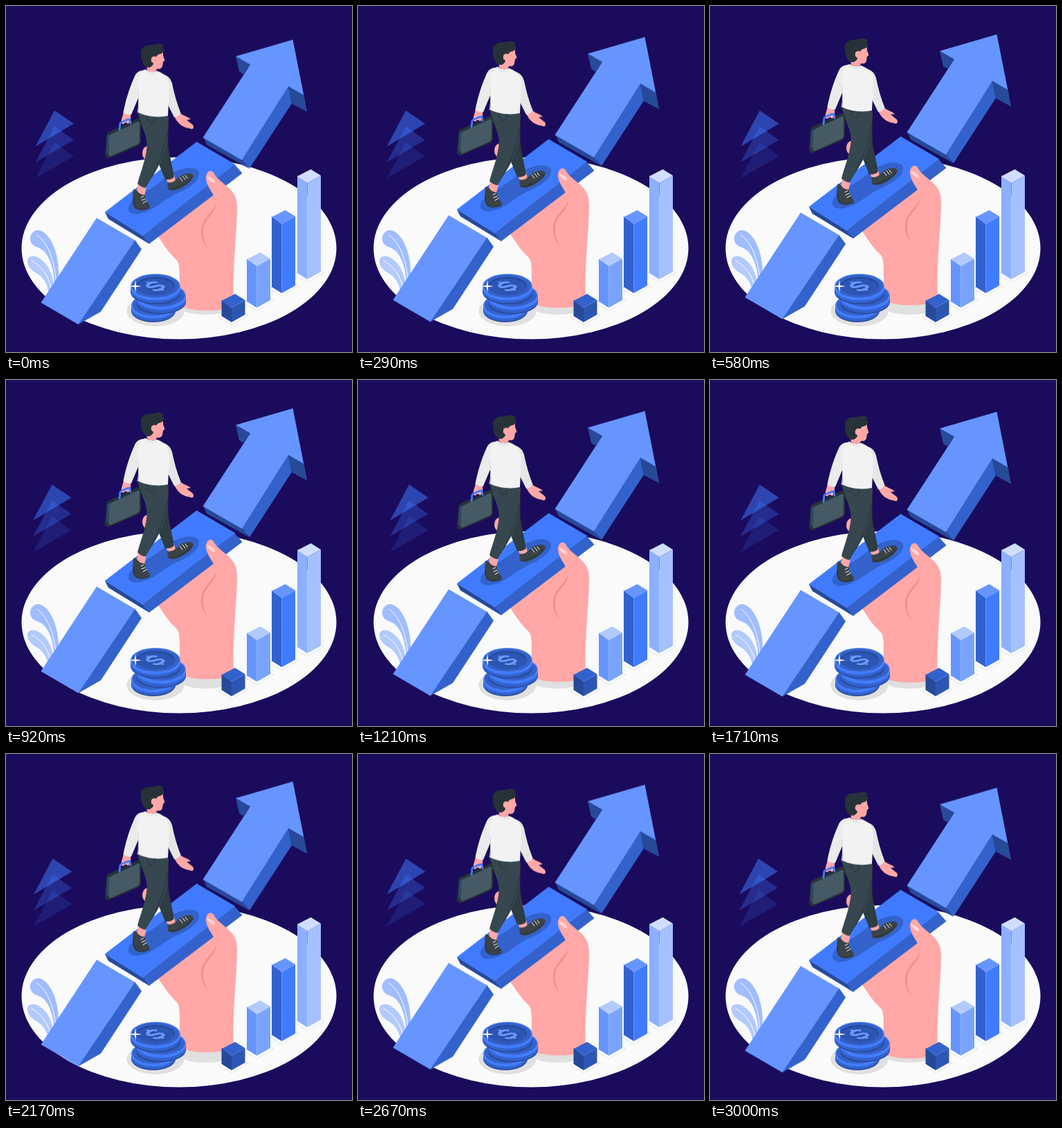
Write an HTML page that moves like this. It is 500 px wide and 500 px high and loops after 3.04 s.

```html
<!DOCTYPE html>
<html lang="en">
<head>
<meta charset="utf-8">
<title>Walking up the arrow</title>
<style>
html, body { margin: 0; width: 100%; height: 100%; overflow: hidden; background: #1b0b5c; }
svg { display: block; width: 100vw; height: 100vh; }
.main { fill: #407bff; }
.light { fill: #6695ff; }
.deep { fill: #3362cc; }
.dark { fill: #264a99; }
.skin { fill: #ffa8a7; }
.ink { fill: #263238; }
.shoe { fill: #3a4347; }
.cloth { fill: #37474f; }
.line { fill: none; stroke-linecap: round; stroke-linejoin: round; }
</style>
</head>
<body>
<svg viewBox="0 0 500 500">
  <ellipse cx="250" cy="350" rx="227.5" ry="131.5" fill="#fafafa"/>

  <g id="peaks" class="main">
    <path d="M70 197L98 217L42.500 249Z" opacity=".16"/>
    <path d="M70 174L98 193.500L42.500 226Z" opacity=".3"/>
    <path d="M70 151L98 170L42.500 203Z" opacity=".52"/>
  </g>

  <g id="plant">
    <path d="M35 338C34 329 42 321 51 325C65 331 77 358 76 390L70 408C70 376 61 354 46 349C40 347 36 344 35 338Z" fill="#a0bdff"/>
    <path d="M31 370C30 361 40 359 49 365C61 373 66 385 69 402L62 414C58 396 51 390 42 385C36 381 32 377 31 370Z" fill="#b3caff"/>
    <g class="line" stroke="#fff" stroke-width="1">
      <path d="M45 331C59 341 70 365 72 396"/>
      <path d="M37 368C51 375 62 390 65 408"/>
    </g>
  </g>

  <ellipse cx="288" cy="432" rx="40" ry="14" fill="#e0e0e0"/>

  <g id="lift">
    <!-- lower ramp -->
    <path class="deep" d="M186 337L196 351L137 441L104.500 459.500L90 445Z"/>
    <path class="light" d="M131 305.500L186.500 338L104.500 459.500L50.500 428Z"/>

    <!-- arrow -->
    <path class="dark" d="M332 72L337 94L343 98L353 84Z"/>
    <path class="deep" d="M408 115L413 140L352 234L341 222Z"/>
    <path class="dark" d="M408 115L430 127L435 152L412.500 140Z"/>
    <path class="dark" d="M285 189L290 200L352 234.500L341 221Z"/>
    <path class="light" d="M414.500 48L332 72L353 84L284.500 189.500L341 222L408 115.500L430 128L435 152Z"/>
    <path class="dark" d="M408 115.500L429.500 128L435 152L412.500 140Z"/>

    <!-- palm and plank -->
    <ellipse class="skin" cx="204" cy="212" rx="7" ry="10"/>
    <path class="skin" d="M206 316L219 331C229 346 236 357 246 366C251 371 251 380 251 400V430C257 442 322 443 329 430C327 370 334 330 334 288L300 250Z"/>
    <path class="deep" d="M143 297L148 307L207 343L341.500 241L330 228L197 331Z"/>
    <path class="dark" d="M143 297L148 307L207 343L197 331Z"/>
    <path class="main" d="M275.500 195.500L331 228L197 331L143 297Z"/>
    <path class="deep" d="M177 291C178 277 206 268 226 251C244 234 271 228 278 238C283 249 268 261 250 269C229 277 217 293 198 298C186 302 176 299 177 291Z"/>

    <!-- thumb -->
    <path class="skin" d="M303 284C304 272 289 262 289 247C290 237 297 235 301 242C309 256 331 262 333.500 283C335 305 329 330 329 350L298 345C286 325 296 296 303 284Z"/>
    <path d="M290 245C291 249 295 253 301 256C303 254 302 251 299 249C296 247 293 246 290 245Z" fill="#ffd4d3"/>
    <path d="M304 284C303 300 286 306 285 323C284 333 287 341 291 349C284 341 281 333 282 322C284 305 299 298 304 284Z" fill="#f28f8f"/>

    <g id="walker">
      <!-- far leg -->
      <path class="skin" d="M231 246L243 243L245 253L234 257Z"/>
      <path class="shoe" d="M233 254C240 256 246 251 250 246C257 242 265 239 270 243C272 250 262 258 249 264C243 267 236 266 234 263Z"/>
      <path d="M211 159L234 158C236 179 232 197 237 216L243 246C240 250 235 251 230 250L214 211Z" fill="#2e3c43"/>
      <path class="line" d="M235 264C249 264 263 255 270 246" stroke="#263238" stroke-width="1.200"/>
      <path class="line" d="M251 247l4 5m0-7l4 5m0-6l3 4" stroke="#fff" stroke-width="1"/>

      <!-- near leg -->
      <path class="skin" d="M191 255L203 261L200 273L189 269Z"/>
      <path class="shoe" d="M184 265C187 262 189 267 193 270C197 273 199 271 201 273C200 281 207 284 208 289C206 295 193 295 187 292C182 285 183 274 184 265Z"/>
      <path class="line" d="M184 278C184 289 187 293 196 294L207 291" stroke="#263238" stroke-width="1.200"/>
      <path class="line" d="M195 276l4-2m-3 6l5-2m-3 6l5-3" stroke="#fff" stroke-width="1"/>
      <path class="cloth" d="M190 151C194 174 207 188 203 208C200 227 194 241 190 256C194 260 198 262 202 262C212 244 230 221 233 193L235 159Z"/>
      <path class="line" d="M204 158C203 171 215 173 216 160M233 181C229 208 220 228 210 247" stroke="#263238" stroke-width="1"/>

      <!-- case -->
      <path class="ink" d="M147 182L190 162C193 161 195 164 195 167V195C194 199 192 201 189 202L149 219C145 220 143 217 143 214L145 186Z"/>
      <path d="M151 185L190 167C192 166 193 167 193 169V194C193 197 191 199 188 200L152 216C149 217 148 215 148 212L149 188Z" fill="#455a64"/>
      <path class="line" d="M148 186L146 212" stroke="#3362cc" stroke-width="1"/>

      <!-- hands -->
      <path class="skin" d="M170 152L180 155C180 162 181 165 178 168C176 172 174 165 171 169C166 173 166 164 168 160Z"/>
      <path class="skin" d="M242 157L250 152C256 159 262 158 267 163L261 164L270 171C273 177 269 178 265 176C256 175 250 170 246 164Z"/>
      <path class="line" d="M164 178L165 169C166 167 176 163 179 163L180 169" stroke="#407bff" stroke-width="2.800"/>

      <!-- sweater -->
      <path d="M201 92C191 92 188 96 185 103C177 121 172.500 138 169.500 153C173 156 177 157 181 156.500L195 123Z" fill="#ebebeb"/>
      <path d="M219 96C233 98 237.500 103 240 111C243 126 247 140 252.500 154C250 158 247 160 243 160L229 132Z" fill="#e6e6e6"/>
      <path d="M202 91C207 95 213 95 218 93C230 97 236 105 236 117L234 158C220 161 202 159 191 153C194 133 188 121 191 106C192 98 196 92 202 91Z" fill="#f2f2f2"/>
      <path class="line" d="M202 94C207 98 213 98 218 96M191 121C192 136 192 145 190 153" stroke="#dcdcdc" stroke-width="1"/>

      <!-- head -->
      <path class="skin" d="M203 85L204 92C208 95 214 95 217 93L218 90C222 91 225 90 226 86L227 80L229.500 78L227 71V65L211 65Z"/>
      <path class="ink" d="M199 59C203 54 209 57 214 55C219 53 226 54 228 57L226 59C230 62 229 66 226 67C222 70 219 68 217 73C215 72 212 71 211 75C209 79 213 80 213 83C211 87 208 89 203 88C197 84 195 76 195 69C194 65 195 61 199 59Z"/>
      <ellipse class="skin" cx="213" cy="77" rx="3.200" ry="4.300"/>
    </g>
  </g>

  <ellipse cx="216" cy="441" rx="41.500" ry="22" fill="#e0e0e0"/>
  <g id="coins"></g>
  <path d="M187 396L188.200 403.800L196 405L188.200 406.200L187 414L185.800 406.200L178 405L185.800 403.800Z" fill="#fff"/>
  <g id="bars"></g>
</svg>
<script>
const NS = 'http://www.w3.org/2000/svg';
const byId = id => document.getElementById(id);

function add(parent, tag, attrs) {
  const el = document.createElementNS(NS, tag);
  for (const key in attrs) el.setAttribute(key, attrs[key]);
  parent.append(el);
  return el;
}

// Coin: side wall, a lit band on it, then the nested ovals of the face.
function coin(x, y, rx, ry, h) {
  const g = byId('coins');
  const wall = (dy, height, fill) => add(g, 'path', {
    d: `M${x - rx} ${y + dy}v${height}a${rx} ${ry} 0 0 0 ${2 * rx} 0v${-height}Z`, fill
  });
  const oval = (dx, dy, fill) => add(g, 'ellipse', {
    cx: x, cy: y + dy, rx: rx - dx, ry: ry - dx * .55, fill
  });
  wall(0, h, '#264a99');
  wall(0, h - 1.5, '#3362cc');
  wall(0, h * .4, '#407bff');
  oval(0, 0, '#6695ff');
  oval(1.2, .3, '#3362cc');
  oval(8, 0, '#264a99');
  oval(9.5, 1.5, '#2d56b3');
}
coin(213, 432, 32, 16, 9);
coin(224, 418, 36, 17, 10);
coin(216, 404.5, 36, 17.5, 9);
const dollar = add(byId('coins'), 'g', { transform: 'matrix(.85 -.4 .85 .45 215.5 405)' });
for (const [shift, stroke] of [[2, '#264a99'], [0, '#6695ff']]) {
  add(dollar, 'path', {
    d: 'M7 -6C5 -11 -7 -10 -7 -4C-7 1 7 -1 7 5C7 11 -5 11 -7 6M0 -12V-9M0 9V12',
    class: 'line', stroke, 'stroke-width': 4.6, transform: `translate(${-shift} ${shift})`
  });
}

// x, top, bottom, then left, right and top colours
const bars = [
  [421, 236, 395, '#8cb0ff', '#a6c1ff', '#d0deff'],
  [384, 295, 415, '#3362cc', '#407bff', '#6695ff'],
  [348, 356, 436, '#6695ff', '#79a3ff', '#b3caff'],
  [311.5, 416, 457, '#264a99', '#2d56b3', '#3362cc']
];
for (const [x, top, bottom, left, right, cap] of bars) {
  const g = byId('bars');
  const mid = x + 14.5, back = x + 19.5, end = x + 34;
  const face = (d, fill) => add(g, 'path', { d, fill });
  add(g, 'path', {
    d: `M${x - 5} ${bottom - 7}L${mid} ${bottom + 4}L${end + 5} ${bottom - 10}L${back} ${bottom - 21}Z`,
    fill: '#fff', stroke: '#d8dcea', 'stroke-width': .8
  });
  face(`M${x} ${top + 9}L${mid} ${top + 20}V${bottom}L${x} ${bottom - 9}Z`, left);
  face(`M${end} ${top + 9}L${mid} ${top + 20}V${bottom}L${end} ${bottom - 11}Z`, right);
  face(`M${x} ${top + 10}L${back} ${top}L${end} ${top + 9}L${mid} ${top + 20}Z`, cap);
}

// Steps are [ms, x, y], linear between them.
const LOOP = 3040, LOW = .7, HIGH = -9.3;
function move(id, steps) {
  const frames = steps.map(([ms, x, y]) => ({
    offset: ms / LOOP, transform: `translate(${x}px, ${y}px)`
  }));
  byId(id).animate(frames, { duration: LOOP, iterations: Infinity });
}
move('lift', [[0, 0, LOW], [750, 0, HIGH], [1500, 0, LOW], [2250, 0, HIGH], [3000, 0, LOW], [LOOP, 0, LOW]]);
move('peaks', [0, -1, 2, -4, 4, -4, 4, -4, 2, -1, 0].map((x, i) => [i * 300, x, 0]).concat([[LOOP, 0, 0]]));
</script>
</body>
</html>
```
